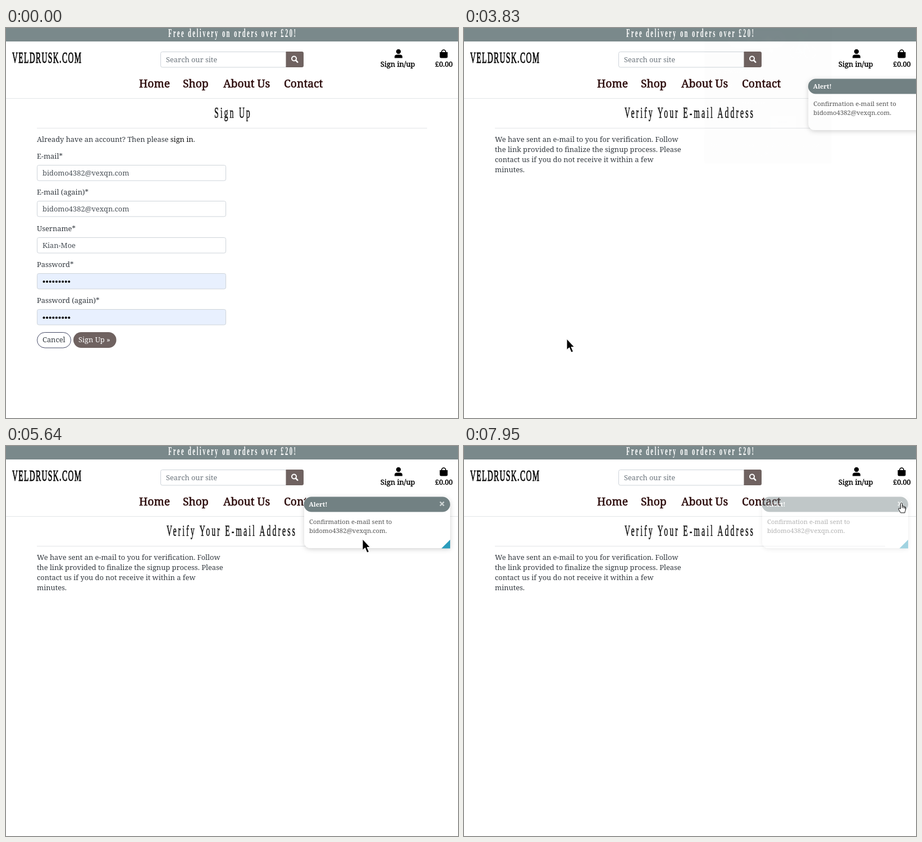
An HTML page that plays this animation: 805x695 px, repeating every 8 s.

```html
<!DOCTYPE html>
<html lang="en">
<head>
<meta charset="utf-8">
<title>Sign up</title>
<style>
  html, body { margin: 0; width: 100%; height: 100%; overflow: hidden; background: #fff; }
  svg { display: block; width: 805px; height: 695px; }
  text { font: 12.85px "Noto Serif", serif; fill: #343a40; }
  .nav text { font-size: 19.3px; fill: #2b0a0a; stroke: #2b0a0a; stroke-width: .55; }
  .menu text { font-size: 12.75px; fill: #000; stroke: #000; stroke-width: .4; }
  .display { font: 27.5px "Liberation Serif", serif; letter-spacing: 6.1px; fill: #111; stroke: #111; stroke-width: .6; }
  .logo { letter-spacing: 2.7px; fill: #000; stroke: #000; stroke-width: .9; }
  .banner { font-size: 21px; font-weight: bold; letter-spacing: 4.9px; fill: #fff; stroke: none; }
  .input { fill: #fff; stroke: #ced4da; }
  .filled { fill: #e8f0fe; }
  .value { fill: #495057; }
  .hint { fill: #6c757d; }
  #alert text { font-size: 11.3px; fill: #555; }
  #alert .title { font-size: 11px; font-weight: bold; fill: #fff; }
  #popup text { font: 8.6px "Open Sans", sans-serif; fill: #e8eaed; }
  #popup .heading { font-size: 10.6px; }
  #popup .note { font-size: 8.5px; fill: #9aa0a6; }
  #popup .button { font-weight: 600; font-size: 8.3px; }
  .field { fill: #202124; stroke: #3c4043; stroke-width: .8; }
</style>
</head>
<body>
<svg viewBox="0 0 805 695">
  <defs>
    <filter id="shadow" x="-20%" y="-20%" width="140%" height="140%">
      <feDropShadow dx="0" dy="2" stdDeviation="4" flood-opacity=".18"/>
    </filter>
    <filter id="darkShadow" x="-20%" y="-20%" width="140%" height="140%">
      <feDropShadow dx="0" dy="1.5" stdDeviation="2" flood-opacity=".5"/>
    </filter>
  </defs>
  <rect width="805" height="695" fill="#fff"/>

  <!-- shop header -->
  <rect width="805" height="24" fill="#7a898b"/>
  <text class="display banner" transform="translate(289 16) scale(.5 1)">Free delivery on orders over £20!</text>
  <text class="display logo" transform="translate(11 62) scale(.5 1)">VELDRUSK.COM</text>
  <rect class="input" x="275.5" y="42.5" width="224" height="27.5" rx="3"/>
  <text class="hint" x="285" y="61">Search our site</text>
  <path d="M498.500 42H527a3 3 0 0 1 3 3v22a3 3 0 0 1-3 3h-28.500z" fill="#6f6260"/>
  <g fill="none" stroke="#fff" stroke-width="2">
    <circle cx="513" cy="54.500" r="4"/>
    <path d="M516 57.500l3.300 3.300" stroke-width="2.500" stroke-linecap="round"/>
  </g>
  <circle cx="699" cy="42" r="4.200"/>
  <path d="M692 53.500v-1.800q0-4.200 4.500-4.200h5q4.500 0 4.500 4.200v1.800z"/>
  <path d="M772.500 43h14v8q0 2.500-2.500 2.500h-9q-2.500 0-2.500-2.500z"/>
  <path d="M776 45.500v-3a3.500 3.500 0 0 1 7 0v3" fill="none" stroke="#000" stroke-width="1.700"/>
  <g class="menu">
    <text x="667" y="69">Sign in/up</text>
    <text x="764" y="69">£0.00</text>
  </g>
  <g class="nav">
    <text x="237" y="106">Home</text>
    <text x="315" y="106">Shop</text>
    <text x="387" y="106">About Us</text>
    <text x="495" y="106">Contact</text>
  </g>
  <path d="M0 125.500H805M55 178.500H750" stroke="#e3e5e7"/>

  <g id="signup">
    <text class="display" transform="translate(371 160) scale(.5 1)">Sign Up</text>
    <text x="55" y="203">Already have an account? Then please <tspan fill="#111">sign in</tspan>.</text>
    <g id="fields"></g>
    <rect x="55.500" y="542.500" width="60" height="27.500" rx="13.750" fill="#fff" stroke="#454a66"/>
    <text x="65" y="560">Cancel</text>
    <rect id="ring" x="118" y="540" width="80.500" height="32" rx="16" fill="#a9cdf0"/>
    <rect id="submit" x="120" y="542" width="76.500" height="28" rx="14"/>
    <text x="129" y="560" style="fill:#fff">Sign Up »</text>
  </g>

  <g id="verify">
    <text class="display" transform="translate(286 160) scale(.5 1)">Verify Your E-mail Address</text>
    <text x="55" y="203">We have sent an e-mail to you for verification. Follow</text>
    <text x="55" y="221">the link provided to finalize the signup process. Please</text>
    <text x="55" y="239">contact us if you do not receive it within a few</text>
    <text x="55" y="257">minutes.</text>
  </g>

  <g id="alert">
    <path d="M544 90.500H778q13 0 13 13V182H544q-13 0-13-13V103.500q0-13 13-13z" fill="#fff" filter="url(#shadow)"/>
    <rect x="530.500" y="90.500" width="260.500" height="27" rx="13.500" fill="#728183"/>
    <path d="M791 167v15.500h-15.500z" fill="#2b9dbc"/>
    <path d="M773 99.500l7 7m0-7l-7 7" stroke="#ced4d4" stroke-width="2.400"/>
    <text class="title" x="539.500" y="108">Alert!</text>
    <text x="540" y="138.500">Confirmation e-mail sent to</text>
    <text x="540" y="154.500">bidomo4382@vexqn.com.</text>
  </g>

  <g id="popup">
    <rect x="421.500" y="-40" width="239.500" height="288" rx="3" fill="#292a2d" filter="url(#darkShadow)"/>
    <path d="M421.500 193.500H661V245q0 3-3 3H424.500q-3 0-3-3z" fill="#35363a"/>
    <path d="M440 30C460 18 478 22 500 33S545 49 582 49" fill="none" stroke="#80868b"/>
    <rect x="465" y="-1" width="110" height="31" rx="15.500" fill="#80868b"/>
    <g fill="none" stroke="#3c4043" stroke-width="2">
      <circle cx="479.500" cy="15" r="3.300"/>
      <path d="M483 15h8m-2 0v3.500"/>
      <circle cx="559.500" cy="15" r="5.500" stroke-width="1"/>
    </g>
    <path d="M502 9l12 6-12 6zM542 7.500l7.500 7.500-7.500 7.500-7.500-7.500z" fill="#fff"/>
    <circle cx="524" cy="15" r="6" fill="#3c4043"/>
    <rect x="543.500" y="32" width="7" height="7" fill="#fde5a8" transform="rotate(25 547 35.500)"/>
    <g fill="none" stroke="#dadce0" stroke-width="1.300">
      <circle cx="593.500" cy="39" r="11"/>
      <circle cx="620.500" cy="39" r="11"/>
      <path d="M593.500 39l6-14h15l-9 15zl12 1M620.500 39l-7-18h5"/>
    </g>
    <path d="M602 19l-4 11 5 9m2-20l6 9-3 12" fill="none" stroke="#4285f4" stroke-width="4"/>
    <path d="M593 10l11-11 14 2-1 10-6-2-3 12-9-2 1-7z" fill="#1ea672"/>
    <path d="M604-3h10v7h-8z" fill="#a5574b"/>
    <text class="heading" x="433.500" y="79">Save password?</text>
    <text x="433" y="104">Username</text>
    <text x="433" y="137">Password</text>
    <rect class="field" x="486" y="89.500" width="162.500" height="23.500" rx="2"/>
    <rect class="field" x="486" y="122" width="138.500" height="23.500" rx="2"/>
    <text x="491" y="104">Kian-Moe</text>
    <path d="M636.500 99.500h7l-3.500 3.800zM612.500 132.300h7l-3.500 3.800z" fill="#dadce0"/>
    <g id="popupDots" fill="#e8eaed"></g>
    <path d="M637.500 133.500q5.500-8 11 0q-5.500 8-11 0z" fill="#9aa0a6"/>
    <circle cx="643" cy="133.500" r="2" fill="#9aa0a6" stroke="#292a2d"/>
    <rect x="545.500" y="157.500" width="48.500" height="24.500" rx="2" fill="#8ab4f8"/>
    <text class="button" x="559.500" y="173" style="fill:#202124">Save</text>
    <rect id="never" x="600.500" y="157.500" width="48" height="24" rx="2" stroke="#4a4d52"/>
    <text class="button" x="612" y="173" style="fill:#8ab4f8">Never</text>
    <text class="note" x="433" y="216.500">Passwords are saved in your Vondle Account so that</text>
    <text class="note" x="433" y="231.500">you can use them on any device</text>
  </g>

  <g id="cursor">
    <path id="arrow" d="M0 0V19.500L4.500 15.500 8 24 11.500 22.500 8 14.500H13.500Z" stroke="#fff"/>
    <path id="hand" fill="#fff" stroke="#111" stroke-linejoin="round"
      d="M-1.500 11V1.500Q0-1 1.500 1.500V6Q3 5 4 6.700Q5.300 6 6 7.500Q7.500 7 7.500 9V13Q6.500 15 6 18H-1.500Q-3 14.500-5 12Q-5.500 9-3 10ZM1.500 6V9.500M4 6.700V10M6 7.500V10.500"/>
  </g>
</svg>
<script>
const $ = id => document.getElementById(id);
const clamp = x => Math.max(0, Math.min(1, x));
const progress = (t, from, to) => clamp((t - from) / (to - from));
const ease = p => p * p * (3 - 2 * p);
const show = (id, on) => $(id).style.display = on ? '' : 'none';

const dots = (x, y, gap, r) => Array.from({ length: 9 },
  (_, i) => `<circle cx="${x + i * gap}" cy="${y}" r="${r}"/>`).join('');

const email = 'bidomo4382@vexqn.com';
$('fields').innerHTML = [
  ['E-mail*', email], ['E-mail (again)*', email], ['Username*', 'Kian-Moe'],
  ['Password*'], ['Password (again)*']
].map(([label, value], i) => {
  const y = 233 + i * 64.25;
  return `<text x="55" y="${y}">${label}</text>
    <rect class="input ${value ? '' : 'filled'}" x="55.5" y="${Math.round(y + 11) + .5}" width="336" height="27.5" rx="3"/>` +
    (value ? `<text class="value" x="65" y="${y + 30}">${value}</text>` : dots(67.5, y + 26.2, 5.6, 2));
}).join('');
$('popupDots').innerHTML = dots(494, 133.7, 5, 1.7);

// Each move: start time, end time, then start, control and end point of a curve.
const moves = [
  [400, 1160, [742, 667], [538, 575], [183, 554]],
  [4320, 5080, [183, 554], [465, 415], [635, 159]],
  [5150, 5290, [635, 159], [635, 163], [635, 166]],
  [6100, 6880, [635, 166], [660, 250], [771, 103]],
  [6950, 7020, [771, 103], [775, 102], [779, 101]]
];

function cursorAt(t) {
  const [from, to, a, b, c] = moves.filter(m => t >= m[0]).pop() || moves[0];
  const p = ease(progress(t, from, to)), q = 1 - p;
  return a.map((v, i) => q * q * v + 2 * p * q * b[i] + p * p * c[i]);
}

function mix(a, b, p) {
  return `rgb(${a.map((v, i) => v + (b[i] - v) * p)})`;
}

function draw(t) {
  const submitted = t >= 3620;
  show('signup', !submitted);
  show('verify', submitted);
  $('submit').setAttribute('fill', mix([111, 98, 96], [114, 129, 131], progress(t, 1160, 1310)));
  $('ring').style.opacity = progress(t, 1790, 2030);

  const slide = 280 * (1 - progress(t, 3620, 4250)) ** 3;
  show('alert', submitted);
  $('alert').setAttribute('transform', `translate(${slide})`);
  $('alert').style.opacity = t < 7880 ? 1 : t < 7950 ? .72 : .44;

  const opened = progress(t, 3830, 4035);
  const scale = .947 + .053 * opened;
  $('popup').style.opacity = opened * (1 - progress(t, 5360, 5570));
  $('popup').setAttribute('transform', `translate(541 124) scale(${scale}) translate(-541 -124)`);
  $('never').setAttribute('fill', t > 5000 ? '#303339' : '#292a2d');

  const pointing = t >= 1230 && t < 3490 || t >= 6950;
  show('cursor', t >= 400);
  show('hand', pointing);
  show('arrow', !pointing);
  $('cursor').setAttribute('transform', `translate(${cursorAt(t)})`);
}

const start = performance.now();
function frame() {
  draw((performance.now() - start) % 8000);
  requestAnimationFrame(frame);
}
frame();
</script>
</body>
</html>
```
